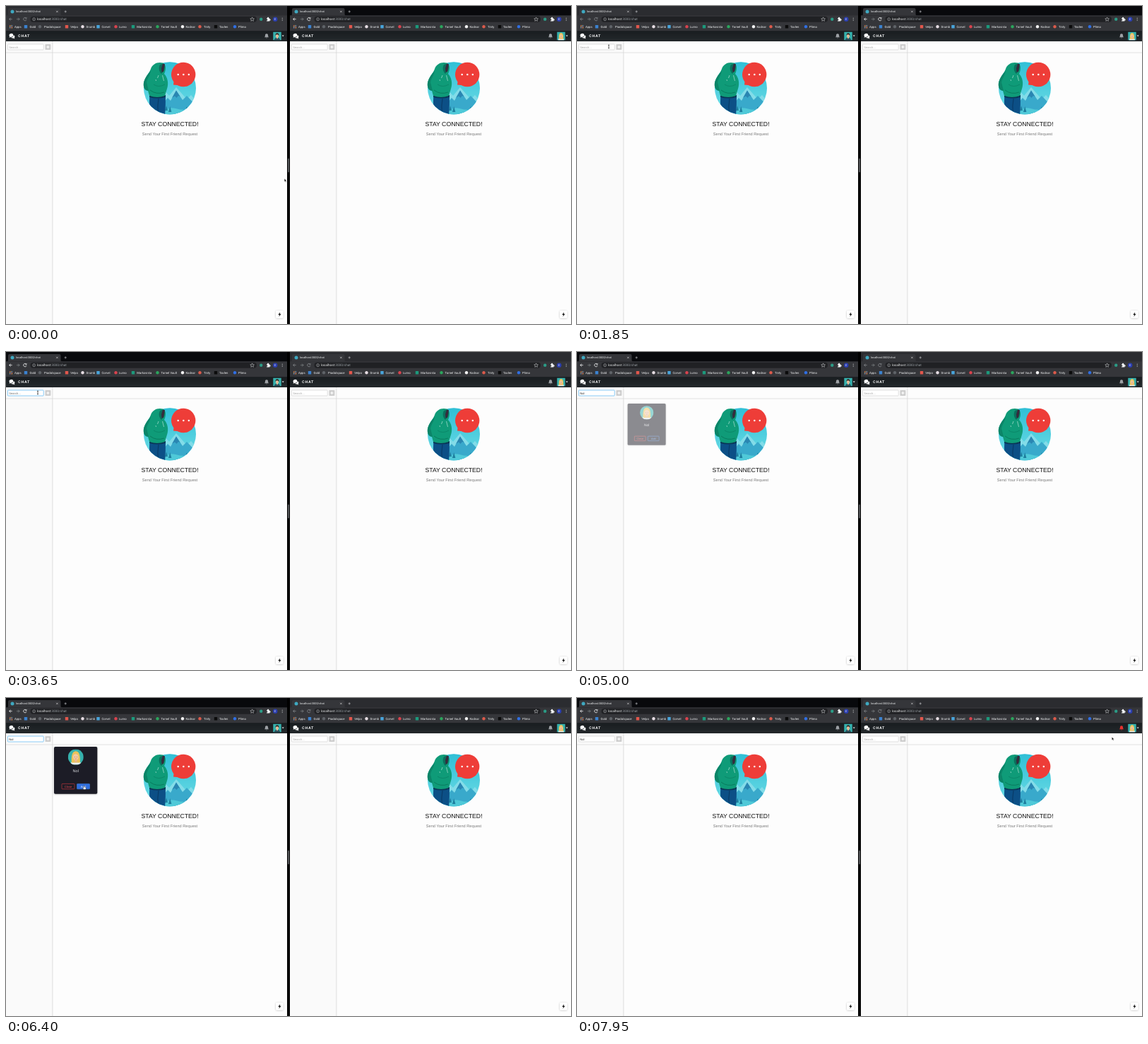
Recreate the animation shown at these times as an HTML page. Size 800x450 px, loop 8000 ms.

```html
<!DOCTYPE html>
<html lang="en">
<head>
<meta charset="utf-8">
<title>Chat</title>
<style>
  html, body { margin: 0; width: 100%; height: 100%; overflow: hidden; background: #fdfdfd; }
  svg { display: block; width: 100vw; height: 100vh; }
  text { font-family: "Liberation Sans", Arial, sans-serif; text-rendering: geometricPrecision; }
  .ui { font-family: Roboto, "Open Sans", sans-serif; fill: #f1f3f4; }
  .brand { font: 700 5px Inter, sans-serif; letter-spacing: .8px; fill: #fff; }
</style>
</head>
<body>
<svg id="stage" viewBox="0 0 800 450" xmlns="http://www.w3.org/2000/svg"></svg>
<script>
const LOOP = 8000;
const USER = 'Nol';
const $ = id => document.getElementById(id);

const rect = (x, y, w, h, fill, more = '') =>
  `<rect x="${x}" y="${y}" width="${w}" height="${h}" fill="${fill}" ${more}/>`;
const dot = (x, y, r, fill, more = '') =>
  `<circle cx="${x}" cy="${y}" r="${r}" fill="${fill}" ${more}/>`;
const path = (d, fill, more = '') => `<path d="${d}" fill="${fill}" ${more}/>`;
const pen = (d, ink, w) =>
  path(d, 'none', `${ink ? `stroke="${ink}"` : ''} stroke-width="${w}"`);
const label = (x, y, size, str, more = '') =>
  `<text x="${x}" y="${y}" font-size="${size}" ${more}>${str}</text>`;

// Vertical blend from one RGB triple to another, in unit rows
function blend(x, y, w, h, from, to) {
  let s = '';
  for (let i = 0; i < h; i++) {
    const mix = from.map((a, k) => Math.round(a + (to[k] - a) * i / (h - 1)));
    s += rect(x, y + i, w, Math.min(1.2, h - i), `rgb(${mix})`);
  }
  return s;
}

// icon x, text x, name, icon fill, round
const bookmarks = [
  [28, 33.5, 'Gold', '#3b82d0', 0],
  [48, 54, 'Pradolspace', '#5f6368', 1],
  [86, 91.2, 'Velpo', '#e2574c', 0],
  [108.5, 113.5, 'Drumb', '#e6dde3', 1],
  [130.5, 135.5, 'Corvel', '#48a5dc', 0],
  [155.5, 160, 'Lurno', '#d9434e', 1],
  [180, 185.3, 'Markovista', '#1b9a7c', 0],
  [214.5, 219.5, 'Tornel Vault', '#2ba55c', 1],
  [250, 254.5, 'Kodnar', '#f4f4f4', 1],
  [274.5, 280, 'Tinty', '#dc5a4b', 1],
  [297, 302, 'Tavlen', '#0b0b0b', 0],
  [324, 329, 'Plimo', '#2f6fe4', 1]
];

function bookmarkBar() {
  let s = '';
  for (let i = 0; i < 9; i++) {
    const row = Math.floor(i / 3);
    s += rect(4.9 + (i % 3) * 1.6, 27.2 + row * 1.6, 1.1, 1.1,
      ['#e8685c', '#e9b44c', '#62a9e8'][(i + row) % 3]);
  }
  s += label(12, 30.8, 4.2, 'Apps', 'class="ui"');
  for (const [ix, tx, name, fill, round] of bookmarks) {
    s += rect(ix - 2.2, 27, 4.4, 4.4, fill, `rx="${round ? 2.2 : .5}"`);
    s += label(tx, 30.8, 4.25, name, 'class="ui"');
  }
  return s;
}

function browser(id) {
  return rect(0, 0, 398, 14, '#08090c', `id="${id}Strip"`) +
    path('M1 13.5Q3 13.5 3 11.5V5Q3 3 5 3H75.5Q77.5 3 77.5 5V11.5Q77.5 13.5 79.5 13.5Z', '#35363a') +
    rect(0, 13.3, 398, 21.9, '#35363a') +
    dot(9, 8, 2.5, '#3fa9c1') +
    label(14, 9.3, 3.9, 'localhost:3000/chat', 'class="ui"') +
    pen('M71.2 6.7l2.4 2.4m0-2.4l-2.4 2.4', '#e0e0e0', .6) +
    pen('M82.6 7.9h3.2m-1.6-1.6v3.2', '#cfd1d4', .6) +
    `<g id="${id}Nav">` +
      pen('M8.7 18.6H4.7m1.9-2l-2 2 2 2', '', .8) +
      pen('M28.7 17.3A2.2 2.2 0 1 0 29 19.3M29 16.1V17.8H27.3', '', .8) +
    '</g>' +
    pen('M15 18.6h4m-1.9-2l2 2-2 2', '#85888c', .7) +
    rect(34.5, 14.8, 320.5, 7.9, '#202124', 'rx="3.95"') +
    dot(39.6, 18.7, 2, 'none', 'stroke="#c4c7ca" stroke-width=".5"') +
    pen('M39.6 18.4v1.4m0-2.5v.5', '#c4c7ca', .5) +
    label(44, 20.3, 4.7, 'localhost<tspan fill="#9aa0a6">:3000/chat</tspan>', 'class="ui"') +
    pen('M348.6 15.9l.85 1.85 2 .23-1.5 1.35.42 2-1.77-1-1.77 1 .42-2-1.5-1.35 2-.23Z', '#e6e8ea', .5) +
    dot(361.2, 18.7, 2.2, '#2b9c86') +
    path('M369 17.2h1.2a1 1 0 1 1 1.8 0h1.3v1.4a.95 .95 0 1 1 0 1.7v1.2h-4.3v-1.3a.9 .9 0 1 0 0-1.6Z', '#f1f3f4') +
    dot(381.2, 18.7, 3.2, '#2c3fb0') +
    label(381.2, 20.1, 3.8, 'E', 'class="ui" text-anchor="middle"') +
    [17, 18.7, 20.4].map(y => dot(391.2, y, .5, '#d5d7da')).join('') +
    bookmarkBar();
}

// Cartoon bust on teal, centred on 0,0 with radius 11
function face(hair, long) {
  return rect(-11, -11, 22, 22, '#35b1ad') +
    path('M-8 11Q-7 5 0 5T8 11Z', long ? '#e8eef0' : '#274b58') +
    (long ? path('M-6 8Q-7-8 0-8T6 8Z', hair) : '') +
    rect(-1.7, 2, 3.4, 5, '#e8b48d') +
    '<ellipse cy="-.5" rx="3.9" ry="5" fill="#f4c9a3"/>' +
    path('M-4.3 0Q-5.5-8 0-8T4.3 0Q3.5-4 0-4.3T-4.3 0Z', hair) +
    dot(-1.5, 0, .45, '#333') + dot(1.5, 0, .45, '#333') +
    pen('M-1.3 2.3Q0 3.2 1.3 2.3', '#b45b4a', .5);
}

function scene() {
  return '<g clip-path="url(#disc)">' +
    blend(194, 78, 76, 76, [47, 191, 214], [111, 221, 230]) +
    path('M208 139L223 118 231 127 241 115 256 132 262 126 272 138V156H208Z', '#83dce8') +
    path('M215 146L229 130 233 134 241 119.5 250 133 256 127 272 144V156H215Z', '#39a9cb') +
    path('M241 119.5L235 130 239 127.5 241.5 130 244 127 246.5 128Z', '#2a86b2') +
    path('M219 156Q228 141 240 145T270 145V156Z', '#4fc9d8') +
    path('M225 148l2-7 2 7ZM230 150l2.2-8 2.2 8ZM254 148l2-6 2 6Z', '#1e7f9f') +
    path('M203.5 126H226Q226 141 225 156H205Q202 141 203.5 126Z', '#0c4f86') +
    pen('M216 131Q214 142 215.5 153', '#083a67', 1.2) +
    path('M203 126H226V129Q214 132 203 129Z', '#0a3555') +
    '</g>' +
    path('M205 89C207 82 215 78.5 222 80.5C227 82.5 227 90 224 96C229 101 230.5 110 228 117L225 127Q214 131 203 127L201 120C195 120 193 111 196.5 104C199 98 203 95 205 89Z', '#0f9b78') +
    path('M205 91C204 99 200 102 199 108T202 120C195 120 193 111 196.5 104C199 98 203 95 205 91Z', '#0b8568') +
    path('M218 83C224 80 226 84 224 91L220 96C216 92 216 87 218 83Z', '#0a6f5d') +
    path('M220 88L222 81.5 225 82.2 223 93 220.5 93.5Z', '#352c3d') +
    pen('M204 119Q213 126 224 122', '#087358', .8) +
    pen('M209 111Q216 116 225 111', '#0a7e62', .7) +
    pen('M216 98L214.5 102M221.5 98L223.5 106M212 104l.5 2', '#c9efe2', .6) +
    dot(251.2, 97, 17.2, '#ee3d38') +
    path('M238 104L237 111.5 247 112.5Z', '#ee3d38') +
    [243.7, 251.3, 258.8].map(x => dot(x, 97, 1.25, '#fff')).join('');
}

function page(id, hair, long) {
  return rect(0, 35, 398, 415, '#fdfdfd') +
    rect(0, 50, 66, 400, '#fafafa') +
    rect(0, 65.6, 398, .8, '#d9d9d9') +
    rect(65.5, 50, .8, 400, '#d6d6d6') +
    blend(0, 35, 398, 15, [25, 29, 32], [35, 40, 43]) +
    // chat bubbles
    path('M4.5 41.3a2.9 2.4 0 1 1 3.3 2.35Q6.3 44 4.3 44.6Q5.2 43.6 5 42.9A2.5 2.5 0 0 1 4.5 41.3Z', '#fff') +
    path('M10.6 41.2a2.4 2.2 0 0 1 1.2 3.6q0 .7.7 1.4q-1.5 0-2.3-.7q-2 .3-3.2-.9q3.6-.4 3.6-3.4Z', '#fff') +
    '<text x="17" y="44.3" class="brand">CHAT</text>' +
    `<g id="${id}Bell" fill="#9da1a5">` +
      '<path d="M369 39.2c1.7 0 2.1 1.4 2.1 2.7 0 1.2.4 1.7.9 2.3h-6c.5-.6.9-1.1.9-2.3 0-1.3.4-2.7 2.1-2.7Z"/>' +
      '<path d="M368.2 44.7h1.6a.8 .8 0 0 1-1.6 0Z"/></g>' +
    `<g transform="translate(384 42.5) scale(.52)">${face(hair, long)}</g>` +
    path('M390.7 41.6h2.9l-1.45 1.7Z', '#fff') +
    rect(2.4, 54, 50.8, 8, '#fff', `id="${id}Field" rx=".8" stroke="#d3d3d3" stroke-width=".7"`) +
    label(4.3, 59.6, 4.1, 'Search...', `id="${id}Text" fill="#a5a5a5"`) +
    rect(55.4, 54, 8, 8, '#cfcfcf', 'rx="1"') +
    pen('M57.3 58h4.2m-2.1-2.1v4.2', '#fff', 1.1) +
    scene() +
    label(232, 170, 8.7, 'STAY CONNECTED!', 'text-anchor="middle" fill="#111"') +
    label(232, 182.6, 5.62, 'Send Your First Friend Request', 'text-anchor="middle" fill="#7b7b7b"') +
    rect(382, 431, 10.5, 10.5, '#fff', 'rx="1.5" filter="url(#soft)"') +
    path('M388.2 433.2L385.3 436.9H387.1L386.4 439.7 389.6 435.7H387.7Z', '#111');
}

function button(x, ink, textInk, str, id) {
  return rect(x, 121.4, 18, 7.4, 'none', `id="${id}" rx=".8" stroke="${ink}" stroke-width=".6"`) +
    label(x + 9, 126.6, 4.2, str, `id="${id}Text" text-anchor="middle" fill="${textInk}"`);
}

function card() {
  return '<g id="card">' +
    rect(68, 69, 61.3, 66.7, '#1a1d25', 'rx="1.8" filter="url(#soft)"') +
    `<g transform="translate(98.8 83.6)" clip-path="url(#round)">${face('#ecc35c', 1)}</g>` +
    label(98.7, 104.8, 5.6, USER, 'text-anchor="middle" fill="#d8dade"') +
    button(79, '#d8393f', '#e2474c', 'Close', 'close') +
    button(100.5, '#3f7fe0', '#5b94ea', 'Add', 'add') +
    '</g>';
}

function pointers() {
  return '<g id="arrow">' +
      path('M0 0V4.4L1.05 3.5 1.8 5.1 2.6 4.7 1.9 3.2 3.2 3.1Z', '#000', 'stroke="#fff" stroke-width=".45"') +
    '</g><g id="beam">' +
      pen('M-.9-2.5Q0-2.5 0-1.8Q0-2.5.9-2.5M0-1.8V1.8M-.9 2.5Q0 2.5 0 1.8Q0 2.5.9 2.5', '#111', .7) +
    '</g><g id="hand">' +
      path('M-.5 0Q0-.6.5 0V1.9L2.4 2.4Q3 2.7 2.8 3.6L2.3 5.5H-.5L-2 3.5Q-1.8 2.7-.5 3.4Z', '#fff', 'stroke="#111" stroke-width=".4"') +
    '</g>';
}

$('stage').innerHTML = `<defs>
  <clipPath id="disc"><circle cx="232" cy="116.3" r="37"/></clipPath>
  <clipPath id="round"><circle r="11"/></clipPath>
  <filter id="soft" x="-30%" y="-30%" width="160%" height="160%"><feDropShadow dx="0" dy=".5" stdDeviation="1" flood-opacity=".28"/></filter>
</defs>` +
  `<g>${page('l', '#3a2a25', 0)}${browser('l')}</g>` +
  `<g transform="translate(402)">${page('r', '#ecc35c', 1)}${browser('r')}</g>` +
  rect(398, 0, 4, 450, '#000') +
  rect(399, 215.5, 2, 20, '#55575a', 'rx="1"') +
  card() + `<g id="pointer">${pointers()}</g>`;

const clamp = v => Math.max(0, Math.min(1, v));
const ease = p => p * p * (3 - 2 * p);

// pointer stops: time, x, y
const stops = [
  [0, 394.2, 244.3], [100, 394.2, 244.3], [950, 142.7, 82.6], [1100, 142.7, 82.6],
  [1850, 45, 57.5], [5400, 45, 57.5], [6100, 110.5, 124], [6650, 110.5, 124],
  [7650, 757.3, 55.2], [LOOP, 757.3, 55.2]
];

function pointerAt(t) {
  const i = stops.findIndex(s => s[0] > t);
  const [t0, x0, y0] = stops[i - 1], [t1, x1, y1] = stops[i];
  const p = ease((t - t0) / (t1 - t0));
  return [x0 + (x1 - x0) * p, y0 + (y1 - y0) * p];
}

const set = (id, name, value) => $(id).setAttribute(name, value);
const show = (id, on) => { $(id).style.display = on ? '' : 'none'; };

function draw(t) {
  const leftActive = t >= 2300;
  for (const [id, on] of [['l', leftActive], ['r', !leftActive]]) {
    set(id + 'Strip', 'fill', on ? '#08090c' : '#2b2c30');
    set(id + 'Nav', 'stroke', on ? '#f1f3f4' : '#85888c');
  }

  const focus = t >= 2950 && t < 6500;
  const typed = [3950, 4150, 4350].filter(k => t >= k).length;
  set('lField', 'stroke', focus ? '#58b7f2' : '#d3d3d3');
  set('lText', 'fill', typed ? '#222' : focus ? '#6c6c6c' : '#a5a5a5');
  $('lText').textContent = typed ? USER.slice(0, typed) : 'Search...';

  const open = t < 6500 ? clamp((t - 4850) / 300) : 1 - clamp((t - 6500) / 200);
  set('card', 'opacity', open);
  set('card', 'transform', `translate(98.7 102.4) scale(${.76 + .24 * open}) translate(-98.7 -102.4)`);

  const [x, y] = pointerAt(t);
  const overField = y > 53 && y < 62 && x > 2 && x < 53;
  const overAdd = open > 0 && x > 100 && x < 119 && y > 121 && y < 129;
  const kind = overAdd ? 'hand' : overField ? 'beam' : 'arrow';
  for (const k of ['arrow', 'beam', 'hand']) show(k, k === kind);
  show('pointer', t < 3950 || t >= 5400);
  set('pointer', 'transform', `translate(${x} ${y})`);
  set('add', 'fill', overAdd ? '#2f6fe0' : 'none');
  set('addText', 'fill', overAdd ? '#fff' : '#5b94ea');

  set('rBell', 'fill', t >= 6750 ? '#e5322f' : '#9da1a5');
}

function tick() {
  draw(performance.now() % LOOP);
  requestAnimationFrame(tick);
}
tick();
</script>
</body>
</html>
```
